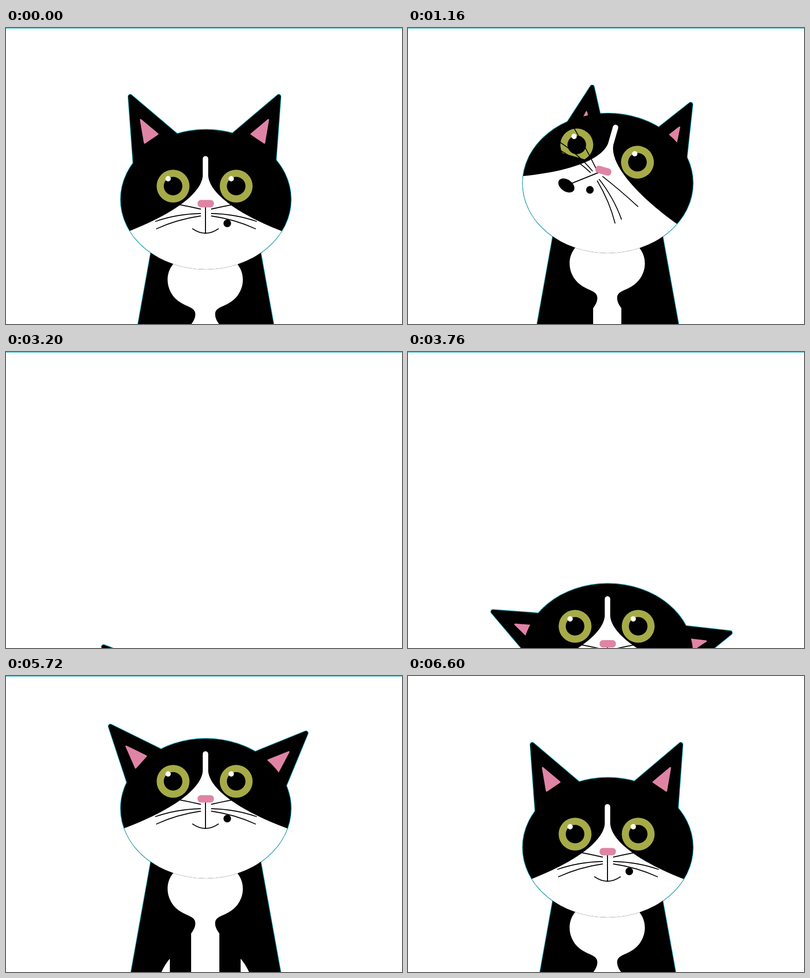
Recreate the animation shown at these times as an HTML page. Size 800 by 600 pixels, loop 6640 ms.

```html
<!DOCTYPE html>
<html lang="en">
<head>
<meta charset="utf-8">
<title>Cat</title>
<style>
  html, body { margin: 0; width: 100%; height: 100%; overflow: hidden; background: #fff; }
  svg { display: block; width: 800px; height: 600px; }
</style>
</head>
<body>
<svg id="stage" viewBox="0 0 800 600"></svg>
<script>
const LOOP = 6640, STEP = 40;
const TEAL = '#12a9ba', GREEN = '#a6ab48', PINK = '#e084a5';
const stage = document.getElementById('stage');

// Smooth curve through [time, value] keys that never overshoots them.
function curve(keys) {
  const slope = i => (keys[i + 1][1] - keys[i][1]) / (keys[i + 1][0] - keys[i][0]);
  const tangent = i => {
    if (i === 0 || i === keys.length - 1) return 0;
    const a = slope(i - 1), b = slope(i);
    return a * b <= 0 ? 0 : 2 * a * b / (a + b);
  };
  return t => {
    const last = keys.length - 1;
    if (t <= keys[0][0]) return keys[0][1];
    if (t >= keys[last][0]) return keys[last][1];
    const i = keys.findIndex(k => k[0] > t) - 1;
    const [t0, v0] = keys[i], [t1, v1] = keys[i + 1];
    const d = t1 - t0, u = (t - t0) / d, w = 1 - u;
    return v0 * w * w * (1 + 2 * u) + v1 * u * u * (3 - 2 * u)
      + d * u * w * (tangent(i) * w - tangent(i + 1) * u);
  };
}

// The head tilt leaves rest, swings to both sides and comes back to rest.
const tiltTimes = [320, 560, 900, 1160, 1400];
const swing = (...values) =>
  curve([[40, 0], ...tiltTimes.map((t, i) => [t, values[i]]), [1720, 0]]);

const tracks = {
  bob: swing(-24, -13, -26, -33, -18),
  faceX: swing(4, 4, 2, 1, 0),
  tilt: swing(-15, -13, 8, 16, 9),
  whiskers: swing(-24, -14, 24, 51, 26),
  mouthSwing: swing(-40, -26, 30, 68, 34),
  mouthReach: swing(4, 2, 10, 20, 8),
  mouthTurn: swing(-30, -26, 12, 35, 18),
  open: swing(1, 1, 1, 0.82, 0.4),
  lidL: swing(3, 2, 4, 9, 4),
  lidR: swing(10, 11, 4, 0, 0),
  leftX: swing(-27, -14, 55, 121, 70),
  leftY: swing(10, 13, -14, 14, 2),
  leftTurn: swing(-6, -2, 20, 37, 20),
  rightX: swing(-92, -102, 36, 20, 10),
  rightY: swing(-31, -32, 30, 49, 22),
  rightTurn: swing(-27, -30, 8, 2, 1)
};

// Peeking up, ducking, then jumping back into view.
const peek = {
  jump: curve([[3160, 408], [3200, 396], [3460, 280], [3680, 262], [3840, 265],
    [4480, 265], [4600, 310], [4720, 420]]),
  spread: curve([[3200, 20], [3560, 36], [4480, 36], [4720, 30]]),
  look: () => -28
};
const leap = {
  jump: curve([[5480, 420], [5520, 396], [5600, 130], [5720, -79], [5800, -69],
    [6000, -28], [6240, -3], [6600, 0]]),
  spread: curve([[5520, 20], [5720, 14], [5800, 11], [6000, 4], [6240, 0]]),
  look: curve([[5720, -28], [6000, -10], [6240, 0]])
};

function poseAt(t) {
  const pose = { jump: 0, spread: 0, look: 0 };
  for (const name in tracks) pose[name] = tracks[name](t);
  const move = t < 2640 ? null : t < 5000 ? peek : leap;
  for (const name in move) pose[name] = move[name](t);
  return pose;
}

function turn(x, y, deg) {
  const a = deg * Math.PI / 180, c = Math.cos(a), s = Math.sin(a);
  return [x * c - y * s, x * s + y * c];
}

const g = (transform, content) => `<g transform="${transform}">${content}</g>`;
const circle = (x, y, r, fill) => `<circle cx="${x}" cy="${y}" r="${r}" fill="${fill}"/>`;
const mirror = (width, content) => content + g(`translate(${width}) scale(-1 1)`, content);

const headShape = 'cx="403.7" cy="347.5" rx="172" ry="141.5"';
const bodyShape = 'd="M296 436L249 700H558.500L511 436Z"';
const earShape = 'd="M251 139L262.800 300L371 241Z"';
const innerEar = `<path d="M272 186L306.500 215L280 233Z" fill="${PINK}" stroke="${PINK}"
  stroke-width="3" stroke-linejoin="round"/>`;

const chest = mirror(805, `<g fill="#fff">
  <path d="M403 465H355C316 485 319 535 352 556C367 566 382 566 382.500 580C382.500 589 378 595 374 601V720H403Z"/>
  <path d="M331 652Q322 662 314 679L295 720H331Z"/></g>`);

const mask = `<path fill="#fff" d="M397.500 265a5.500 5.500 0 0 1 11 0V300C412 338 476 382 571 417
  L670 450V640H140V450L235 417C330 382 394 338 397.500 300Z"/>`;

const whiskers = mirror(808, `<path fill="none" stroke="#000" stroke-width="1.8" stroke-linecap="round"
  d="M393 367Q350 357 301 350M393 376Q345 377 302 392M393 381Q345 388 304 407"/>`);

const chinLine = `<path d="M339 479.500A172 141.500 0 0 0 468 479.500" fill="none" stroke="#ddd"
  stroke-dasharray="9 1"/>`;

// Each ear turns on its own tip, and fans out around the head's middle.
function ears(p, color, grow, inner) {
  const ear = `<path ${earShape} fill="${color}" stroke="${color}" stroke-width="${8 + grow}"
    stroke-linejoin="round"/>${inner}`;
  const right = g('translate(802) scale(-1 1)', ear);
  return g(`rotate(${-p.spread} 402 323) translate(${p.leftX} ${p.leftY}) rotate(${p.leftTurn} 251 139)`, ear)
    + g(`translate(${p.spread * 0.35}) rotate(${p.spread * 1.3} 402 323)
      translate(${p.rightX} ${p.rightY}) rotate(${p.rightTurn} 551 139)`, right);
}

function outline(p) {
  const paint = `fill="${TEAL}" stroke="${TEAL}" stroke-width="2.4"`;
  return `<path ${bodyShape} ${paint}/>${ears(p, TEAL, 2.4, '')}<ellipse ${headShape} ${paint}/>`;
}

function eye(side, tilt, lid) {
  const [x, y] = turn(side * 63.75, 0, tilt);
  const r = 33.4, depth = r - lid, half = Math.sqrt(r * r - depth * depth);
  const lower = lid > 0.3
    ? `<path d="M${-half} ${depth}A${r} ${r} 0 0 0 ${half} ${depth}Z" stroke="#000"/>` : '';
  return g(`translate(${x} ${y}) rotate(${tilt})`,
    circle(0, 0, 33.2, GREEN) + circle(0, 0, 18.8, '#000') + circle(-10, -15, 5.4, '#fff') + lower);
}

function mouth(p) {
  const shape = p.open < 0.15
    ? '<path d="M-26 -9Q0 9 26 -9" fill="none" stroke="#000" stroke-width="2" stroke-linecap="round"/>'
    : `<ellipse rx="${22 * p.open}" ry="${14.5 * p.open}"/>`;
  return shape + circle(44, -20, 7.7, '#000');
}

function face(p) {
  const [nx, ny] = turn(2.25, 35.5, p.tilt);
  const [mx, my] = turn(0, 60 + p.mouthReach, p.mouthSwing);
  const muzzle = g(`translate(0 ${p.bob * 0.12}) rotate(${p.whiskers}) translate(-403.500 -356)`, whiskers)
    + `<path d="M-0.500 0L${mx - 0.5} ${my}" stroke="#000" stroke-width="2"/>`
    + g(`translate(${mx - 0.5} ${my}) rotate(${p.mouthTurn})`, mouth(p))
    + `<rect x="-16.500" y="-7.500" width="33" height="15" rx="7" fill="${PINK}" transform="rotate(${p.tilt})"/>`;
  return g(`translate(${401.25 + p.faceX} ${320.5 + p.bob + p.look})`,
    eye(-1, p.tilt, p.lidL) + eye(1, p.tilt, p.lidR) + g(`translate(${nx} ${ny})`, muzzle));
}

function cat(p) {
  const fur = g(`translate(${p.faceX} ${p.bob + p.look}) rotate(${p.tilt} 401.25 320.5)`, mask);
  return g(`translate(0 ${p.jump + p.bob})`,
    outline(p)
    + `<path ${bodyShape}/>` + chest
    + ears(p, '#000', 0, innerEar)
    + `<ellipse ${headShape}/><g clip-path="url(#head)">${fur}</g>`
    + chinLine + face(p));
}

function draw(t) {
  const hidden = (t >= 2640 && t < 3200) || (t >= 4720 && t < 5520);
  stage.innerHTML = `<defs><clipPath id="head"><ellipse ${headShape}/></clipPath></defs>`
    + (hidden ? '' : cat(poseAt(t)))
    + (t < 6600 ? `<rect width="800" height="1" fill="${TEAL}"/>` : '');
}

const start = performance.now();
let shown = -1;
function tick() {
  const t = Math.floor((performance.now() - start) % LOOP / STEP) * STEP;
  if (t !== shown) draw(shown = t);
  requestAnimationFrame(tick);
}
tick();
</script>
</body>
</html>
```
